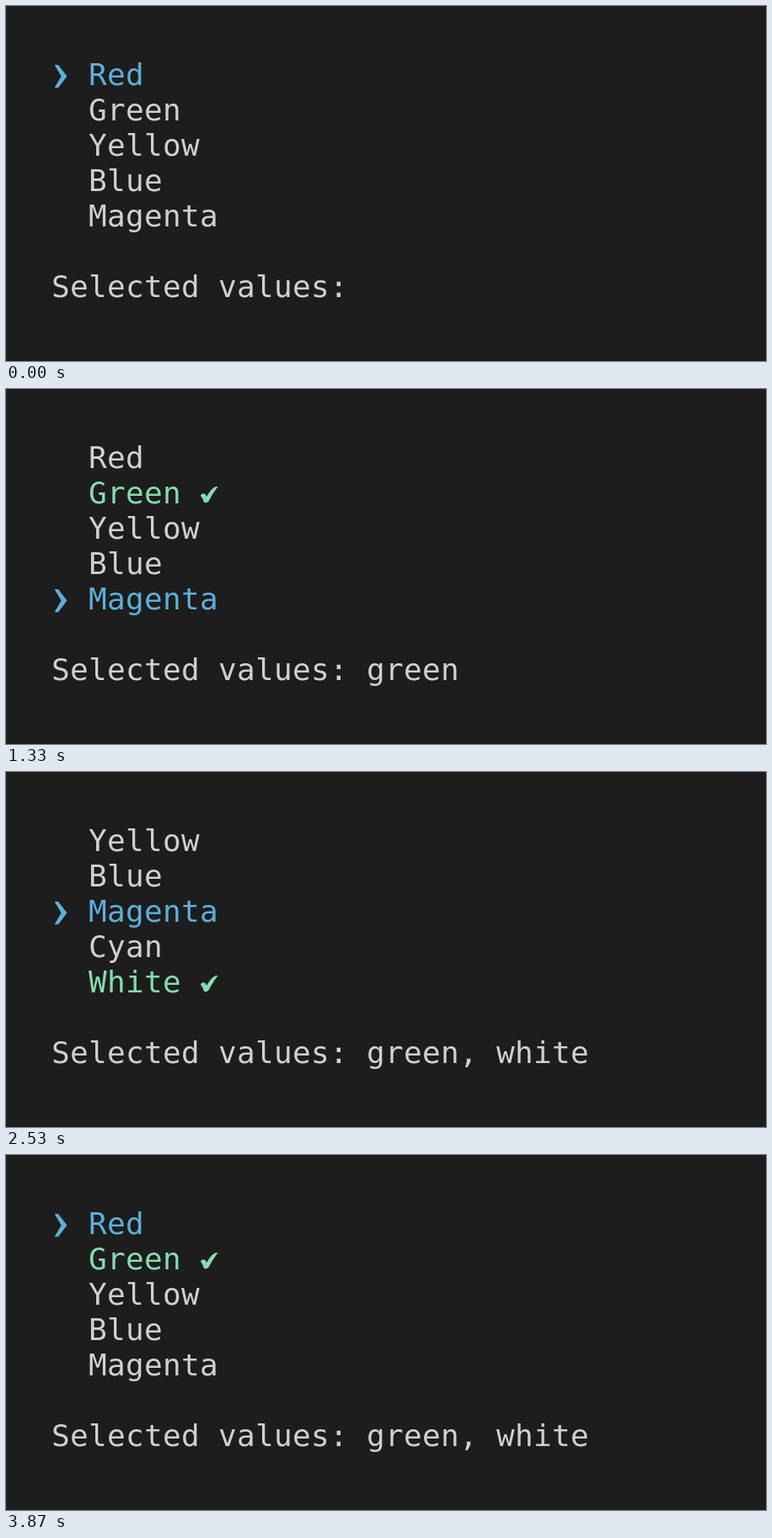
These frames come from a looping animation (902 px wide and 422 px high, 4.57 s). An HTML page:

```html
<!DOCTYPE html>
<html lang="en">
<head>
<meta charset="utf-8">
<title>Multi select</title>
<style>
  html, body { margin: 0; width: 100%; height: 100%; overflow: hidden; background: #1d1d1d; }
  svg { display: block; width: 902px; height: 422px; }
  text {
    font: 36px "DejaVu Sans Mono", "Noto Sans Mono", monospace;
    letter-spacing: 0.327px; /* 22px cells */
    fill: #d0d0d0;
  }
  .focused text, .pointer { fill: #5eafd9; }
  .chosen text, .tick { fill: #86dcae; }
</style>
</head>
<body>
<svg viewBox="0 0 902 422">
  <rect width="902" height="422" fill="#1d1d1d"/>
  <rect width="1" height="422" fill="#2a2a2a"/>
  <defs>
    <path id="pointer" d="M57.6 -24H62L72.4 -10.4L62 3.2H57.6L65.6 -10.4Z"/>
    <path id="tick" d="M1 -9Q1.5 -11.8 4.5 -11.8Q7 -11.8 8 -8Q12.5 -16 17 -19Q19 -20.3 21.5 -20Q15 -11.5 10.5 -2.5Q9.2 -0.8 6.5 -0.8Q5 -0.8 4.4 -2.5Q3.5 -6.5 1 -9Z"/>
  </defs>
  <g id="rows"></g>
  <text id="summary" x="54" y="346"></text>
</svg>
<script>
const LOOP = 4570, VISIBLE = 5, CELL = 22, LEFT = 54, BASE = 94, LINE = 42;
const options = ["Red", "Green", "Yellow", "Blue", "Magenta", "Cyan", "White"];

// Key presses: time in ms and key
const keys = [
  [370, "down"], [670, "space"],
  [1070, "down"], [1170, "down"], [1270, "down"], [1400, "down"], [1470, "down"],
  [1830, "space"],
  [2270, "up"], [2430, "up"], [2570, "up"], [2630, "up"], [2700, "up"], [2800, "up"]
];

const rows = document.getElementById("rows");
const summary = document.getElementById("summary");

function press(state, key) {
  if (key === "space") {
    state.chosen.push(state.focus);
  } else if (key === "down") {
    state.focus++;
    if (state.focus >= state.top + VISIBLE) state.top++;
  } else {
    state.focus--;
    // Moving up keeps one row of context above the pointer
    if (state.focus <= state.top) state.top = Math.max(0, state.top - 1);
  }
}

function rowMarkup(index, row, state) {
  const label = options[index];
  const focused = index === state.focus;
  const chosen = state.chosen.includes(index);
  const style = focused ? "focused" : chosen ? "chosen" : "";
  const tickX = LEFT + CELL * (label.length + 3);
  return `<g class="${style}" transform="translate(0 ${BASE + row * LINE})">` +
    (focused ? '<use href="#pointer" class="pointer"/>' : "") +
    `<text x="${LEFT + 2 * CELL}">${label}</text>` +
    (chosen ? `<use href="#tick" class="tick" x="${tickX}"/>` : "") +
    "</g>";
}

function draw(count) {
  const state = { focus: 0, top: 0, chosen: [] };
  keys.slice(0, count).forEach(([, key]) => press(state, key));
  rows.innerHTML = options.slice(state.top, state.top + VISIBLE)
    .map((_, row) => rowMarkup(state.top + row, row, state)).join("");
  const values = state.chosen.map(i => options[i].toLowerCase()).join(", ");
  summary.textContent = `Selected values: ${values}`;
}

let shown = -1;
const start = performance.now();

function update(now) {
  const time = Math.max(0, now - start) % LOOP;
  const count = keys.filter(([at]) => at <= time).length;
  if (count !== shown) draw(shown = count);
  requestAnimationFrame(update);
}
update(start);
</script>
</body>
</html>
```
